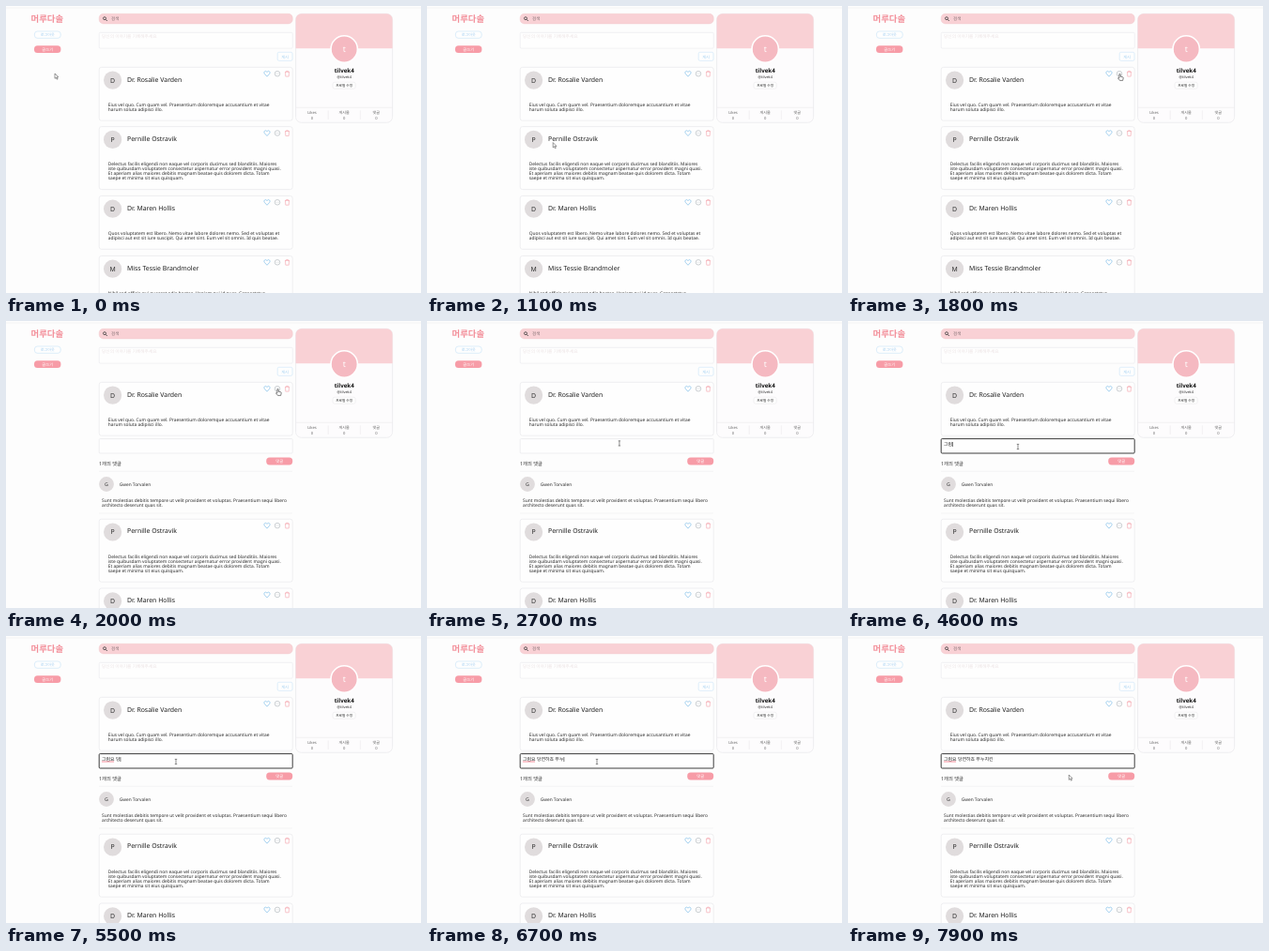
Animation, 442 px wide and 306 px high, one loop 8000 ms. Source, as an HTML page:

```html
<!DOCTYPE html>
<html lang="ko">
<head>
<meta charset="utf-8">
<title>Feed</title>
<style>
  html, body { margin: 0; width: 100%; height: 100%; overflow: hidden; background: #fdfdfd; }
  svg { display: block; width: 442px; height: 306px; }
  text {
    font-family: "Noto Sans", "Noto Sans CJK KR", "Noto Sans CJK JP", sans-serif;
    text-rendering: geometricPrecision;
    white-space: pre;
  }
</style>
</head>
<body>
<svg id="stage" viewBox="0 0 442 306"></svg>
<script>
const LOOP = 8000, STEP = 100, SHIFT = 82.6;
const OPEN_AT = 2000, FOCUS_AT = 3300;
const PINK = '#f79ca7', PALE = '#f9d1d5', BLUE = '#a3d0f2', EDGE = '#e9e8eb', INK = '#2a2a2a';

const text = (x, y, size, str, fill = INK, more = '') =>
  `<text x="${x}" y="${y}" font-size="${size}" fill="${fill}" ${more}>${str}</text>`;
const mid = (x, y, size, str, fill, more = '') =>
  text(x, y, size, str, fill, `text-anchor="middle" ${more}`);
const box = (x, y, w, h, r, fill, stroke = 'none', sw = 0.7) =>
  `<rect x="${x}" y="${y}" width="${w}" height="${h}" rx="${r}" fill="${fill}" stroke="${stroke}" stroke-width="${sw}"/>`;
const path = (d, stroke, sw = 0.7, fill = 'none') =>
  `<path d="${d}" fill="${fill}" stroke="${stroke}" stroke-width="${sw}" stroke-linejoin="round"/>`;
const avatar = (x, y, r, size, letter) =>
  `<circle cx="${x}" cy="${y}" r="${r}" fill="#e0dcdd"/>` + mid(x, y + size * 0.36, size, letter);

function icons(y) {
  return path(`M278 ${y + 3}l-2.6-2.8c-1.6-2 1.2-4.4 2.6-1.9c1.4-2.5 4.2-.1 2.6 1.9z`, '#7fbde9', 0.7) +
    `<circle cx="289" cy="${y}" r="2.8" fill="none" stroke="#a3abb0" stroke-width=".55"/>` +
    path(`M287.5 ${y}h.6m.6 0h.6m.6 0h.6`, '#a3abb0', 0.55) +
    path(`M297 ${y - 1.9}h5m-3.4 0v-.9h1.8v.9m-2.9 0l.3 4.8h3.4l.3-4.8`, '#f4a0a8', 0.6);
}

function card(y, letter, name, lines) {
  return box(99.2, y, 206, 46.8 + 5.05 * lines.length, 2.5, '#fefefe', EDGE) +
    avatar(113.6, y + 13.8, 9.6, 6.9, letter) +
    text(129, y + 15.3, 6.9, name, '#1c1c1c') +
    icons(y + 6.9) +
    lines.map((s, i) => text(108.7, y + 41.6 + 5.05 * i, 4.86, s)).join('');
}

const sidebar =
  text(26.6, 16.6, 9.4, '머루다솔', '#f38e99', 'font-weight="700"') +
  box(30.4, 27, 27.8, 7.3, 3, '#fefefe', '#c6e2f7', 0.6) +
  mid(44.3, 32.2, 4.1, '로그아웃', BLUE) +
  box(30, 42.2, 28.4, 7.9, 3.6, PINK) +
  mid(44.2, 47.8, 4.3, '글쓰기', '#fff');

const composer =
  box(99.2, 8.3, 206, 10.6, 4.4, PALE, '#f1c8cd', 0.5) +
  `<circle cx="105" cy="13.2" r="1.5" fill="none" stroke="#444" stroke-width=".8"/>` +
  path('M106.1 14.3l1.7 1.7', '#444', 0.9) +
  text(112, 15.2, 4.5, '검색', '#7d6c6f') +
  box(99.2, 28.3, 206, 16.8, 1, '#fefefe', '#ebebef') +
  text(102, 34, 4.7, '당신의 이야기를 기록해주세요', '#ebe2e3') +
  box(289.2, 49.3, 15.8, 9, 1.5, '#fefefe', '#c9e4f8', 0.6) +
  mid(297.1, 55.5, 4.3, '게시', BLUE);

const stat = (x, label) =>
  mid(x, 115.2, 4.1, label, '#666') + mid(x, 120.9, 4.1, '0', '#666');
const profile =
  box(308.6, 8.3, 103, 116, 6, '#fdfcfd', EDGE) +
  `<path d="M308.6 45.3V14.3a6 6 0 0 1 6-6h91a6 6 0 0 1 6 6v31z" fill="${PALE}"/>` +
  `<circle cx="360.2" cy="46" r="14.2" fill="#f5b9c1" stroke="#fff" stroke-width="1.6"/>` +
  mid(360.2, 49, 8.6, 't', '#fff') +
  mid(360.2, 71.4, 6.2, 'tilvek4', '#111', 'font-weight="700"') +
  mid(360.2, 76.9, 3.9, '@tilvek4', '#333') +
  box(348, 81.2, 24.2, 7, 2, '#fefefe', EDGE, 0.6) +
  mid(360.1, 86.1, 3.7, '프로필 수정', '#222', 'font-weight="500"') +
  path('M308.6 108.2h103M343.2 111.5v9.5M377.3 111.5v9.5', EDGE, 0.6) +
  stat(326, 'Likes') + stat(360.2, '게시물') + stat(394.3, '댓글');

const panel =
  `<rect id="field" x="99.2" y="125.6" width="206" height="15.4" rx="1" fill="#fefefe"/>` +
  text(102, 133, 4.95, '', '#222', 'id="typed"') +
  `<path id="wave" d="M102 134.3l1-.6${'l1 .6l1-.6'.repeat(6)}" fill="none" stroke="#ee4458" stroke-width=".6"/>` +
  `<path id="caret" d="M0 129v5" stroke="#222" stroke-width=".6"/>` +
  text(99, 153.5, 5.3, '1개의 댓글') +
  box(277.2, 145.6, 28, 7.8, 3.6, PINK) +
  mid(291.2, 151.1, 4.3, '댓글', '#fff') +
  path('M99 160.2h206M99 205h206', '#ececee', 0.6) +
  avatar(107, 174, 7.9, 5.2, 'G') +
  text(120.7, 176.1, 4.8, 'Gwen Torvalen') +
  text(102, 192.5, 4.86, 'Sunt molestias debitis tempore ut velit provident et voluptas. Praesentium sequi libero') +
  text(102, 197.5, 4.86, 'architecto deserunt quas sit.');

const rest =
  card(128.6, 'P', 'Pernille Ostravik', [
    'Delectus facilis eligendi non eaque vel corporis ducimus sed blanditiis. Maiores',
    'iste quibusdam voluptatem consectetur aspernatur error provident magni quasi.',
    'Et aperiam alias maiores debitis magnam beatae quis dolorem dicta. Totam',
    'saepe et minima sit eius quisquam.']) +
  card(202.4, 'D', 'Dr. Maren Hollis', [
    'Quos voluptatem est libero. Nemo vitae labore dolores nemo. Sed et voluptas et',
    'adipisci aut est sit iure suscipit. Qui amet sint. Eum vel sit omnis. Id quis beatae.']) +
  card(266.4, 'M', 'Miss Tessie Brandmoler', [
    'Nihil sed officia qui quaerat odio beatae. Veniam qui id quas. Consectetur', '']);

const pointers =
  `<g id="arrow">${path('M0 0v5.3l1.3-1.1l.9 2l.9-.4l-.9-1.9h1.6z', '#444', 0.55, '#fff')}</g>` +
  `<g id="hand">${path('M-.6 .3q.6-.7 1.2 0v2.4l2.6.6q.6.2.5 1l-.5 2.6h-3.2l-2-2.6q.3-.8 1.4 0z', '#333', 0.6, '#fff')}</g>` +
  `<g id="beam">${path('M-1.2-2.6h2.4M0-2.6v5.2M-1.2 2.6h2.4', '#444', 0.6)}</g>`;

document.getElementById('stage').innerHTML =
  box(0, 0, 442, 306, 0, '#fdfdfd') + box(0, 1.6, 442, 0.8, 0, '#f0f0f1') +
  sidebar + composer + profile +
  card(65.3, 'D', 'Dr. Rosalie Varden', [
    'Eius vel quo. Cum quam vel. Praesentium doloremque accusantium et vitae',
    'harum soluta adipisci illo.']) +
  `<g id="panel">${panel}</g><g id="rest">${rest}</g>` + pointers;

const $ = id => document.getElementById(id);
const show = (id, on) => $(id).setAttribute('visibility', on ? 'visible' : 'hidden');

// time, x, y; moves are linear between keys
const track = [
  [0, 52, 72], [200, 45, 95], [300, 45, 95], [500, 107, 158], [600, 107, 158], [700, 112, 156],
  [1000, 112, 156], [1800, 289.5, 72.5], [2200, 289.5, 72.5], [2800, 188, 142],
  [3000, 188, 142], [3300, 181, 134], [7700, 181, 134], [7900, 235.3, 148], [8000, 235.3, 148]
];
const typing = [
  [4200, 'ㄱ'], [4300, '그'], [4400, '그러'], [4600, '그럼'],
  [4900, '그럼ㅇ'], [5000, '그럼요'], [5100, '그럼요 '],
  [5300, '그럼요 ㄷ'], [5400, '그럼요 다'], [5500, '그럼요 당'],
  [5600, '그럼요 당ㅇ'], [5700, '그럼요 당여'], [5800, '그럼요 당연'],
  [6000, '그럼요 당연하'], [6100, '그럼요 당연핮'], [6200, '그럼요 당연하죠'], [6300, '그럼요 당연하죠 '],
  [6500, '그럼요 당연하죠 무'], [6600, '그럼요 당연하죠 문'], [6700, '그럼요 당연하죠 무누'],
  [6900, '그럼요 당연하죠 무눛'], [7000, '그럼요 당연하죠 무누치'],
  [7100, '그럼요 당연하죠 무누치키'], [7200, '그럼요 당연하죠 무누치킨']
];

function pointAt(t) {
  const i = track.findIndex(k => k[0] > t);
  const [t0, x0, y0] = track[i - 1], [t1, x1, y1] = track[i];
  const p = (t - t0) / (t1 - t0);
  return [x0 + (x1 - x0) * p, y0 + (y1 - y0) * p];
}

function draw(t) {
  const open = t >= OPEN_AT, focus = t >= FOCUS_AT;
  $('panel').style.display = open ? '' : 'none';
  $('rest').setAttribute('transform', `translate(0 ${open ? SHIFT : 0})`);
  $('field').setAttribute('stroke', focus ? '#3c3c3c' : EDGE);
  $('field').setAttribute('stroke-width', focus ? 1 : 0.7);

  const str = typing.reduce((s, [at, v]) => t >= at ? v : s, '');
  $('typed').textContent = str;
  const caretOn = open && focus && !(t >= 3800 && t < 4200) && t < 7800;
  $('caret').setAttribute('transform',
    `translate(${102.4 + (str ? $('typed').getComputedTextLength() : 0)} 0)`);
  $('caret').style.display = caretOn ? '' : 'none';
  $('wave').style.display = t >= 5100 ? '' : 'none';

  const [x, y] = pointAt(t);
  const inField = open && x > 99 && x < 305 && y > 125.6 && y < 141;
  const onIcon = x > 274 && y > 68 && y < 77;
  const kind = inField ? 'beam' : onIcon ? 'hand' : 'arrow';
  for (const id of ['arrow', 'hand', 'beam']) show(id, id === kind);
  $(kind).setAttribute('transform', `translate(${x} ${y})`);
}

const start = performance.now();
let last = -1;
function tick() {
  const t = Math.floor((performance.now() - start) % LOOP / STEP) * STEP;
  if (t !== last) draw(last = t);
  requestAnimationFrame(tick);
}
tick();
</script>
</body>
</html>
```
